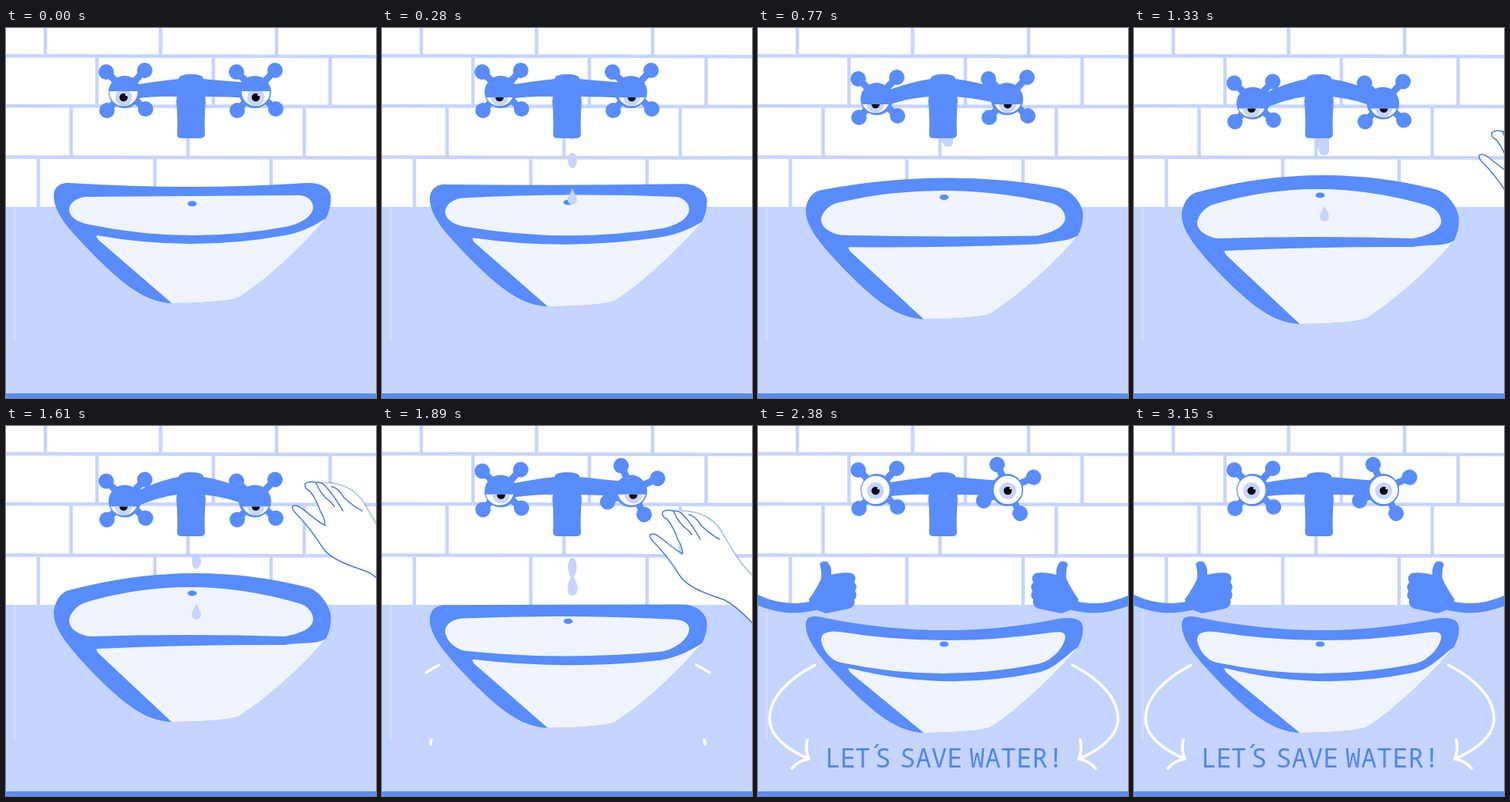
An HTML page for the animation above (3.22 s loop, 480x480 px).

```html
<!DOCTYPE html>
<html lang="en">
<head>
<meta charset="utf-8">
<title>Let's save water</title>
<style>
  html, body { margin: 0; width: 100%; height: 100%; overflow: hidden; background: #fff; }
  svg { display: block; width: 100vw; height: 100vh; }
  .blue { fill: #588cff; }
  .pale { fill: #c6d5ff; }
  .china { fill: #eff4fd; }
  .grout { fill: none; stroke: #c6d5ff; stroke-width: 4.5; }
  .limb { fill: none; stroke: #588cff; stroke-width: 12.5; }
  .spokes { stroke: #588cff; stroke-width: 9; }
  .arrow { fill: none; stroke: #fff; stroke-width: 3.6; stroke-linecap: round; stroke-linejoin: round; stroke-dasharray: 1 2; }
  .outline { fill: none; stroke: #4778dc; stroke-width: 1.5; stroke-linecap: round; stroke-linejoin: round; }
  text { font: 300 34px "Noto Sans Mono", "DejaVu Sans Mono", monospace; fill: #5086f2; }
</style>
</head>
<body>
<svg viewBox="0 0 480 480">
  <defs>
    <g id="cross">
      <path class="spokes" d="M-24-26L27 23M26-28L-23 24"/>
      <g class="blue">
        <circle r="21"/>
        <circle cx="-24" cy="-26" r="10"/><circle cx="26" cy="-28" r="10"/>
        <circle cx="-23" cy="24" r="10"/><circle cx="27" cy="22" r="10"/>
      </g>
    </g>
    <clipPath id="lid"><rect id="lidBox" x="-22" width="44" height="60"/></clipPath>
    <g id="eye" clip-path="url(#lid)">
      <circle r="18.3" fill="#fff"/>
      <g id="iris">
        <circle r="11" class="pale"/>
        <circle r="5.3" fill="#05070d"/>
        <circle cx="3.5" cy="-3" r="1.2" fill="#fff"/>
      </g>
    </g>
    <g id="arrow">
      <path class="arrow" pathLength="1" d="M74 310C40 328 15 352 15 380C15 402 38 420 66 432"/>
      <path class="arrow" pathLength="1" d="M64 407Q61 420 66 432Q53 434 44 444"/>
    </g>
    <g id="grip">
      <path class="limb" d="M-130 220Q-40 220-5 244C12 258 35 257 62 240"/>
      <path class="blue" d="M50 238Q66 230 82 234Q99 227 97 215Q101 211 104 217Q104 230 97 238Q109 247 107 258Q110 264 103 268Q105 276 97 277Q95 285 87 284Q82 289 76 278Q65 276 56 267Q47 258 50 238Z"/>
    </g>
    <g id="thumb">
      <path class="limb" d="M-8 222Q34 244 76 232"/>
      <path class="blue" d="M66 225Q76 211 82 198Q83 189 80 179Q83 174 90 176Q96 183 95 193Q111 189 122 191Q129 195 125 203Q130 208 126 214Q130 221 125 225Q127 234 118 237Q103 240 88 243Q77 239 70 236Z"/>
    </g>
  </defs>

  <path class="grout" d="M0 36L480 37M0 101L480 102M0 167.500L480 168.500M51 0V36M200.500 0V36M351 0V36M118 36V101M269 36V101M420.500 36V101M84.500 101V168M236 101V168M387 101V168M42 168V232M193 168V232M344 168V232"/>
  <path class="pale" d="M0 232H480V480H0Z"/>
  <path d="M11.500 232V406" stroke="#e3eaff"/>
  <path class="blue" d="M0 474H480V480H0Z"/>

  <g id="arrows"><use href="#arrow"/><use href="#arrow" transform="translate(482) scale(-1 1)"/></g>
  <g id="slogan">
    <text x="87" y="443" letter-spacing="-1">LET<tspan x="142" dy="-4">´</tspan><tspan x="152" dy="4">S</tspan></text>
    <text x="184" y="443">SAVE</text>
    <text x="274" y="443">WATER!</text>
  </g>

  <path id="rim" class="blue"/>
  <path id="bowl" class="china"/>
  <path id="panel" class="china"/>
  <ellipse id="drain" class="blue" cx="241.5" rx="6" ry="3.5"/>
  <path id="water" class="pale"/>

  <path id="bar" class="blue"/>
  <path class="blue" d="M224 65Q226 60 240 60Q254 60 256 65L259 95Q257 118 258 138Q258 143 252 143H228Q222 143 222 138Q223 118 221 95Z"/>
  <g id="handles">
    <use href="#cross" x="154" y="83"/>
    <use id="valve" href="#cross"/>
    <use href="#eye" x="152.500" y="83"/>
    <use href="#eye" x="324" y="83"/>
  </g>

  <g id="grips"><use id="gripL" href="#grip"/><use id="gripR" href="#grip"/></g>
  <g id="thumbs"><use href="#thumb"/><use href="#thumb" transform="translate(482) scale(-1 1)"/></g>

  <g id="hand">
    <path fill="#fff" d="M348 142Q350 138 356 141C370 150 380 160 390 166Q384 144 370 121L364 113Q366 108 378 110L388 110C412 110 430 120 440 136C452 156 462 176 480 193L640 310V390L480 255Q460 234 445 226L423 218Q396 208 387 195Q370 168 352 150Z"/>
    <path class="outline" d="M640 390L480 255Q460 234 445 226L423 218Q396 208 387 195Q370 168 352 150Q346 144 348 141Q352 138 360 144C370 151 380 161 390 166Q389 154 384 148Q379 132 370 121Q363 118 364 112Q367 108 378 110Q384 126 398 136L402 141M378 110Q387 109 393 118Q403 129 413 147M398 115Q407 117 414 129Q425 140 438 147"/>
    <path class="outline" stroke-opacity=".5" d="M388 110C412 110 430 120 440 136C452 156 462 176 480 193L640 310"/>
  </g>
</svg>

<script>
const LOOP = 3220, STEP = 70;
const $ = id => document.getElementById(id);
const set = (id, attrs) => {
  for (const name in attrs) $(id).setAttribute(name, attrs[name]);
};
const show = (id, on) => { $(id).style.display = on ? '' : 'none'; };
const mix = (a, b, k) => a + (b - a) * k;
const ramp = (t, from, to) => Math.min(1, Math.max(0, (t - from) / (to - from)));
const ease = (t, from, to) => {
  const k = ramp(t, from, to);
  return k * k * (3 - 2 * k);
};

// Each key is [time, value, ...]; values are interpolated linearly.
function track(keys, t) {
  let i = 1;
  while (i < keys.length - 1 && keys[i][0] < t) i++;
  const [a, b] = [keys[i - 1], keys[i]];
  return a.slice(1).map((v, n) => mix(v, b[n + 1], ramp(t, a[0], b[0])));
}

// Heights along the rim, the bowl opening and the front panel, then base and drain.
const calm  = [218,201,206,201,222, 236,219,218,217,233, 258,269,255, 269,280,247, 357,228];
const sad   = [243,213,191,209,251, 253,228,209,230,251, 273,271,273, 289,285,276, 384,217];
const happy = [258,248,265,250,264, 277,267,278,268,274, 309,321,307, 314,331,287, 398,283];

const bend = (a, b, middle) => 2 * middle - (a + b) / 2;

function drawSink(t) {
  const droop = ease(t, 0, 1120), smile = ease(t, 1650, 2100);
  const [l, tl, tm, tr, r, il, itl, im, itr, ir, ibr, ib, ibl, pl, pm, pr, base, drain] =
    calm.map((v, i) => mix(mix(v, sad[i], droop), happy[i], smile));
  const top = bend(tl, tr, tm), inner = bend(itl, itr, im);
  const lip = ibr + 11;
  const side = `C385 ${pr + 36} 340 ${base - 32} 303 ${base - 8}Q288 ${base - 1} 215 ${base}`;

  set('rim', { d: `M62 ${l}C62 ${l - 10} 68 ${tl - (top - tl) * .08} 82 ${tl}Q240 ${top} 390 ${tr}
    C408 ${tr - (top - tr) * .1} 423 ${r - 14} 421.5 ${r}C421 ${r + 10} 419 ${pr - 8} 415 ${pr}${side}
    C190 ${base - 1} 170 ${base - 13} 150 ${base - 29}C125 ${base - 50} 98 ${base - 78} 80 ${l + 40}
    C68 ${l + 24} 62 ${l + 12} 62 ${l}Z` });
  set('bowl', { d: `M82 ${il}C82 ${il - 9} 92 ${itl - (inner - itl) * .09} 106 ${itl}Q240 ${inner} 380 ${itr}
    C392 ${itr - (inner - itr) * .07} 399 ${ir - 7} 398.5 ${ir}C398 ${ir + 11} 383 ${ibr - 4} 362 ${ibr}
    Q236 ${bend(ibr, ibl, ib)} 108 ${ibl}C92 ${ibl - 3} 82 ${il + 9} 82 ${il}Z` });
  set('panel', { d: `M118 ${pl}Q240 ${bend(pl, lip, pm)} 362 ${lip}C385 ${lip - 4} 402 ${pr + 8} 415 ${pr}${side}
    L120 ${pl + 6}Q116 ${pl + 1} 118 ${pl}Z` });
  set('drain', { cy: drain });
}

const dropStarts = [-70, 70, 270, 700, 910, 1190, 1390, 1610];
const fall = [[140, 154], [210, 172], [280, 196], [350, 219], [420, 241], [490, 267]];

const bead = y => `M247 ${y - 10}c4 0 6 5 6 10s-3 10-6 10s-6-5-6-10s2-10 6-10z`;
const twin = y => `M247 ${y - 25}C252 ${y - 25} 256 ${y - 11} 249 ${y}C258 ${y + 17} 252 ${y + 24} 247 ${y + 24}` +
  `C241 ${y + 24} 238 ${y + 15} 245 ${y}C238 ${y - 11} 242 ${y - 25} 247 ${y - 25}Z`;
const tear = (y, s) =>
  `M247 ${y - 11 * s}c${2 * s} ${6 * s} ${6 * s} ${10 * s} ${6 * s} ${15 * s}` +
  `a${6 * s} ${6 * s} 0 0 1 ${-12 * s} 0c0 ${-5 * s} ${4 * s} ${-9 * s} ${6 * s} ${-15 * s}z`;

// A drop swells at the spout, lets go, stretches, then falls as a tear.
function waterPath(age) {
  if (age <= 0 || age >= 500) return '';
  if (age <= 140) {
    const y = 143 + 22 * age / 140;
    return `M237 140H253V${y - 6}Q253 ${y} 247 ${y}Q241 ${y} 240 ${y - 5}L237 ${mix(143, y, .3)}Z`;
  }
  const [y] = track(fall, age);
  if (age < 245) return bead(y);
  if (age < 315) return twin(y);
  return tear(y, age > 450 ? .4 : 1);
}

function drawTap(t) {
  const d = 14.5 * ease(t, 280, 1120) * (1 - ease(t, 1610, 1960));
  const sag = Math.min(d, 11);
  set('bar', { d: `M160 ${75 + d}Q195 ${69 + d * .15} 224 66H256Q285 ${69 + d * .1} 318 ${71 + d}
    V${91 + d}Q290 ${89 + sag * .3} 256 89H222Q195 ${88 + d * .3} 165 ${92 + d}Z` });
  set('handles', { transform: `translate(0 ${d})` });
  set('valve', { transform: `translate(323 83) rotate(${21.5 * ease(t, 1720, 1890)})` });

  const lid = mix(mix(-1, 7, ease(t, 0, 280)), -20, ease(t, 1850, 2050));
  set('lidBox', { y: lid });
  const [x, y] = track([[0, 0, 7], [1680, 0, 7], [1890, 2, 5], [2100, -3, .5], [2240, -3, .5], [2380, 0, 1]], t);
  set('iris', { transform: `translate(${x} ${y})` });
}

function drawHands(t) {
  const [x, y] = track([[1190, 170, 48], [1330, 100, 24], [1680, 5, -52], [1750, -5, -78],
    [1820, 0, -55], [1890, 0, 0], [1960, 70, 50], [2030, 190, 120]], t);
  show('hand', t > 1190 && t < 2030);
  set('hand', { transform: `translate(${x} ${y})` });

  const reach = -115 * (1 - ease(t, 1900, 2070));
  show('grips', t > 1900 && t < 2210);
  set('gripL', { transform: `translate(${reach})` });
  set('gripR', { transform: `translate(${482 - reach}) scale(-1 1)` });

  show('thumbs', t >= 2210);
  set('thumbs', { transform: `translate(0 ${32 * (1 - ease(t, 2170, 2380))})` });
}

function draw(t) {
  drawSink(t);
  drawTap(t);
  drawHands(t);
  show('water', t > 0);
  set('water', { d: dropStarts.map(start => waterPath(t - start)).join('') });

  const drawn = ramp(t, 1855, 2165);
  show('arrows', drawn > 0);
  for (const line of document.querySelectorAll('.arrow')) line.style.strokeDashoffset = 1 - drawn;
  set('slogan', { opacity: ramp(t, 2170, 2380) });
}

function frame() {
  draw(Math.floor(performance.now() % LOOP / STEP) * STEP);
  requestAnimationFrame(frame);
}
frame();
</script>
</body>
</html>
```
